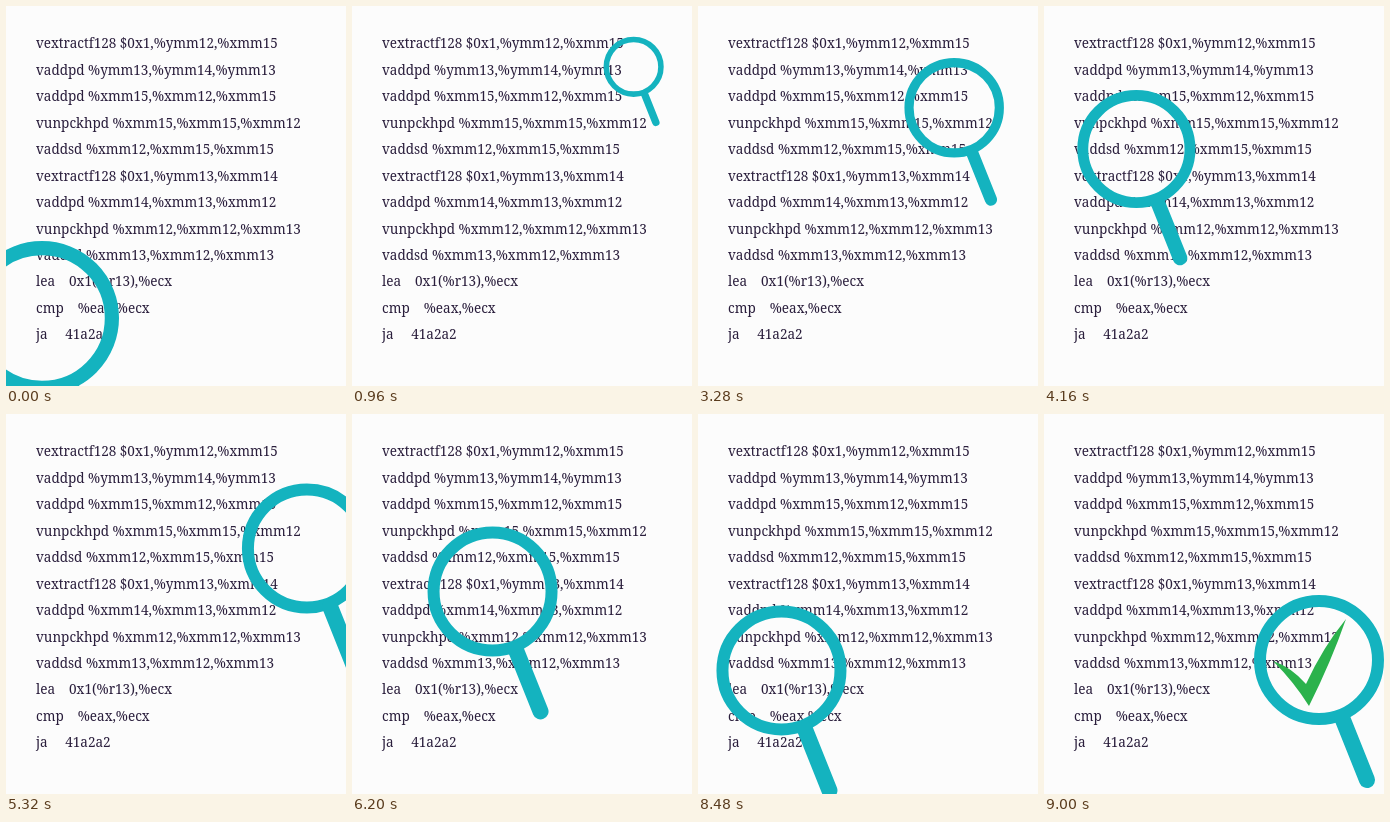
Animation, 340 px wide and 380 px high, one loop 9.72 s. Source, as an HTML page:

```html
<!DOCTYPE html>
<html lang="en">
<head>
<meta charset="utf-8">
<title>Code inspection</title>
<style>
  html, body { margin: 0; width: 100%; height: 100%; overflow: hidden; background: #fcfcfc; }
  svg { display: block; }
  text { font: 13.5px "Noto Serif", serif; fill: #2a1e3c; white-space: pre; }
</style>
</head>
<body>
<svg width="340" height="380" viewBox="0 0 340 380">
  <g id="code"></g>
  <path id="check" fill="#2bb24c" d="M229 247 Q250 268 265 292 Q287 248 302 205 Q279 233 262 270 Q247 253 229 247Z"/>
  <g id="glass" fill="none" stroke="#14b3bf">
    <circle r="59" stroke-width="12"/>
    <path d="M23 57.6 L48 120" stroke-width="16" stroke-linecap="round"/>
  </g>
</svg>
<script>
const LOOP = 9720, STEP = 40, CHECK_AT = 9000, FULL_RADIUS = 65;
const REST_AT = 4720, REST = 587, TILT = 12;

const code = `vextractf128 $0x1,%ymm12,%xmm15
vaddpd %ymm13,%ymm14,%ymm13
vaddpd %xmm15,%xmm12,%xmm15
vunpckhpd %xmm15,%xmm15,%xmm12
vaddsd %xmm12,%xmm15,%xmm15
vextractf128 $0x1,%ymm13,%xmm14
vaddpd %xmm14,%xmm13,%xmm12
vunpckhpd %xmm12,%xmm12,%xmm13
vaddsd %xmm13,%xmm12,%xmm13
lea    0x1(%r13),%ecx
cmp    %eax,%ecx
ja     41a2a2`;

// Where the glass turns back at the right; times leave out the rest.
const first = { t: 40, x: 36, y: 312, r: 77 };
const turns = [
  { t: 1040, x: 303, y: 39, r: 26 },
  { t: 2000, x: 303, y: 67 },
  { t: 3380, x: 292, y: 100 },
  { t: REST_AT, x: 306, y: 133 },
  { t: 6013, x: 281, y: 170 },
  { t: 7213, x: 280, y: 203 },
  { t: CHECK_AT - REST, x: 275, y: 246 }
];

const byId = id => document.getElementById(id);
const glass = byId("glass"), check = byId("check");
const clamp = v => Math.min(1, Math.max(0, v));
const mix = (a, b, k) => a + (b - a) * k;
const progress = (t, from, to) => clamp((t - from) / (to - from));

code.split("\n").forEach((line, i) => {
  const el = document.createElementNS("http://www.w3.org/2000/svg", "text");
  el.setAttribute("x", 30);
  el.setAttribute("y", 42.4 + i * 26.45);
  el.textContent = line;
  byId("code").append(el);
});

// Shrinks from the lower left corner to the end of the top line.
function flyIn(t) {
  const to = turns[0], k = progress(t, first.t, to.t);
  return [mix(first.x, to.x, k), mix(first.y, to.y, k), mix(first.r, to.r, k)];
}

// Swings left and down, then back right on a slight rise, while growing.
function sweep(t) {
  const i = Math.max(1, turns.findIndex(p => p.t >= t));
  const a = turns[i - 1], b = turns[i], mid = (a.t + b.t) / 2;
  const r = mix(turns[0].r, FULL_RADIUS, progress(t, turns[0].t, REST_AT));
  const left = 15 + 0.6 * r, low = b.y + TILT;
  if (t < mid) {
    const k = progress(t, a.t, mid);
    return [mix(a.x, left, k), mix(a.y, low, Math.sin(k * Math.PI / 2)), r];
  }
  const k = progress(t, mid, b.t);
  return [mix(left, b.x, k), mix(low, b.y, k), r];
}

function poseAt(t) {
  if (t < turns[0].t) return flyIn(t);
  const moving = t < REST_AT ? t : Math.max(REST_AT, t - REST);
  return sweep(Math.min(moving, CHECK_AT - REST));
}

function draw(now) {
  const t = Math.floor(now % LOOP / STEP) * STEP;
  const [x, y, r] = poseAt(t);
  glass.setAttribute("transform", `translate(${x} ${y}) scale(${r / FULL_RADIUS})`);
  check.setAttribute("visibility", t >= CHECK_AT ? "visible" : "hidden");
}

const start = performance.now();
function tick() {
  draw(performance.now() - start);
  requestAnimationFrame(tick);
}
tick();
</script>
</body>
</html>
```
